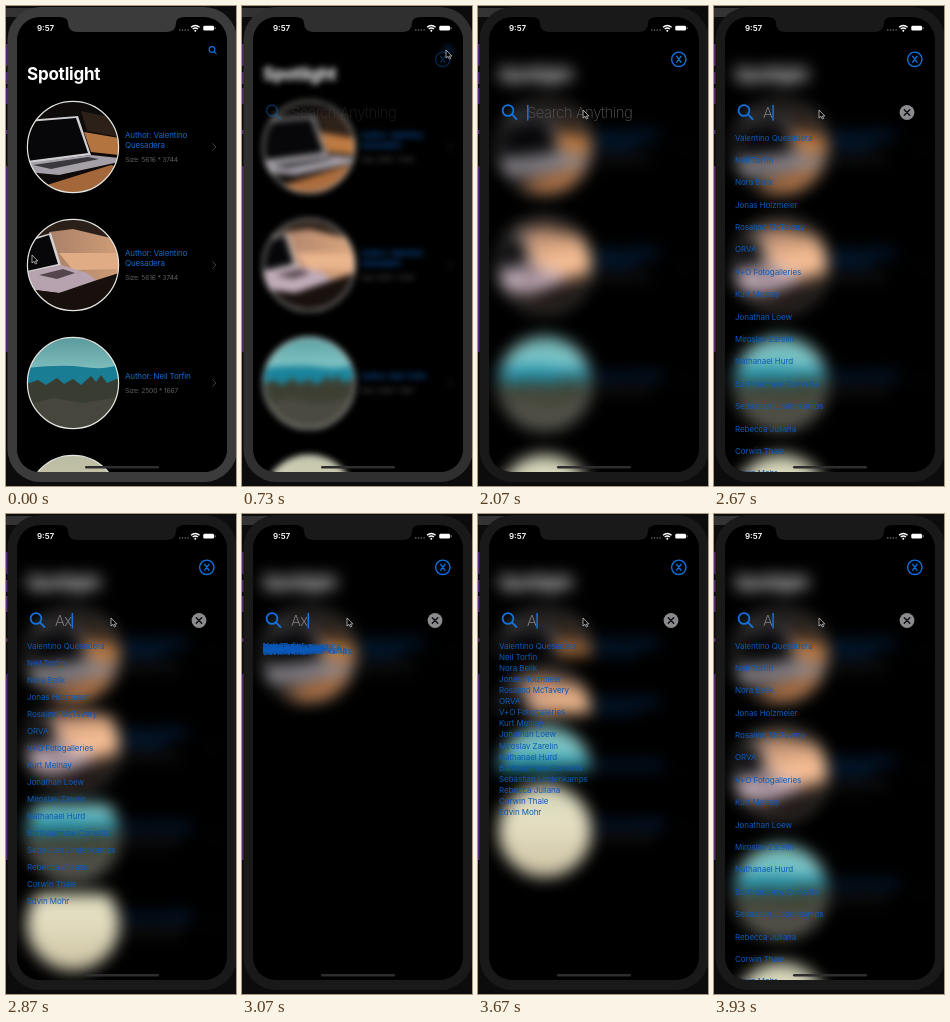
Write an HTML page that moves like this. It is 230 by 480 pixels and loops after 3.99 s.

```html
<!DOCTYPE html>
<html lang="en">
<head>
<meta charset="utf-8">
<title>Search overlay</title>
<style>
  html, body { margin: 0; width: 100%; height: 100%; overflow: hidden; background: #000; }
  svg { display: block; width: 230px; height: 480px; font-family: Inter, "Liberation Sans", sans-serif; }
  .title { font-size: 17px; font-weight: 700; letter-spacing: -.22px; fill: #fff; }
  .author { font-size: 8px; letter-spacing: -.17px; fill: #1269cf; }
  .size { font-size: 6.8px; letter-spacing: -.2px; fill: #5c5c60; }
  .name { font-size: 8px; letter-spacing: -.06px; fill: #0b5abb; }
  .field { font-size: 15px; font-weight: 200; letter-spacing: -.5px; }
  .clock { font-size: 8px; font-weight: 600; fill: #fff; }
  .line { fill: none; stroke: #1272e0; stroke-linecap: round; }
</style>
</head>
<body>
<svg viewBox="0 0 230 480">
  <defs>
    <clipPath id="screen"><rect x="11" y="11" width="210" height="455" rx="23"/></clipPath>
    <clipPath id="disc"><circle r="45.5"/></clipPath>
    <linearGradient id="sky" x2="0" y2=".4"><stop stop-color="#5a9a9c"/><stop offset="1" stop-color="#82c2c2"/></linearGradient>
    <linearGradient id="wood" x2="1" y2="0"><stop stop-color="#a98069"/><stop offset="1" stop-color="#cf9d76"/></linearGradient>
    <linearGradient id="haze" x2="0" y2="1"><stop stop-color="#b9bba2"/><stop offset=".4" stop-color="#cdc8ae"/><stop offset="1" stop-color="#b5ac90"/></linearGradient>

    <g id="photo0">
      <rect x="-46" y="-46" width="92" height="92" fill="#0d0a09"/>
      <path d="M8-36L46-28V-10L14-16Z" fill="#2c2019"/>
      <path d="M11-15L46-9V8L18 5Z" fill="#b4743f"/>
      <path d="M-46-27L5-31L18 8L-46 17Z" fill="#cfcdcf"/>
      <path d="M-46-25L3-29L15 6L-46 14Z" fill="#070709"/>
      <path d="M-46 16L18 8L46 11V15L-14 28L-46 25Z" fill="#a5a0a8"/>
      <path d="M-40 18L15 10L26 12L-22 22Z" fill="#3b383e"/>
      <path d="M-26 38L38 18L46 20L26 46H-18Z" fill="#a4673a"/>
    </g>
    <g id="photo1">
      <rect x="-46" y="-46" width="92" height="92" fill="#2a1f19"/>
      <path d="M-24-33L0-36L46-25V8L20 18L-20 8Z" fill="url(#wood)"/>
      <path d="M-14-12L46-12V4L0 5Z" fill="#dfac86"/>
      <path d="M-46-25L-22-32L-12 0L-46 9Z" fill="#d5d2d3"/>
      <path d="M-46-23L-24-30L-15-1L-46 6Z" fill="#070709"/>
      <path d="M-46 7L-12 0L14 8L24 16L0 25L-14 28L-46 24Z" fill="#b7a3af"/>
      <path d="M-34 10L-10 4L2 8L-16 14Z" fill="#55464d"/>
      <path d="M-46 24L-14 28L24 15L46 8V46H-46Z" fill="#17100d"/>
    </g>
    <g id="photo2">
      <rect x="-46" y="-46" width="92" height="92" fill="url(#sky)"/>
      <path d="M-46-15Q-10-19 10-16T46-18V6H-46Z" fill="#197d94"/>
      <path d="M-46 1L-35-3L-27 2L-16-5L-9 1L0-4L8 2L18-7L23-1L28-8L34 0L46-5V46H-46Z" fill="#393c30"/>
      <path d="M-46 22L-20 15L10 20L46 14V46H-46Z" fill="#46463d"/>
    </g>
    <rect id="photo3" x="-46" y="-46" width="92" height="92" fill="url(#haze)"/>
  </defs>

  <rect width="230" height="480" fill="#0c0c0c"/>
  <rect y="2" width="26" height="9" fill="#333"/>
  <path d="M0 38h2v22h-2zM0 66h2v12h-2zM0 82h2v16h-2zM0 124h2v4h-2zM0 160h2v186h-2z" fill="#582870"/>
  <rect id="shell" x="1.5" y="1" width="229.5" height="475" rx="33" fill="#3b3b3b"/>
  <g clip-path="url(#screen)">
    <rect width="230" height="480"/>
    <g id="list">
      <g id="rows"></g>
      <text class="title" x="21" y="74">Spotlight</text>
      <g id="glass" class="line" stroke-width="1.1"><circle cx="206" cy="43.5" r="2.9"/><path d="M208.2 45.7L210.3 48"/></g>
    </g>
    <g id="search">
      <g class="line" stroke-width="1.8">
        <circle cx="30" cy="104.5" r="5.4"/><path d="M34.2 108.7L38.5 113"/>
        <circle cx="200.8" cy="53.3" r="7.2" stroke-width="1.4"/>
        <path d="M198.7 50.4L202.9 56.2M202.9 50.4L198.7 56.2" stroke-width="1.4"/>
      </g>
      <text id="hint" class="field" x="49" y="112" fill="#58585a">Search Anything</text>
      <text id="typed" class="field" x="49" y="112" fill="#98989c"></text>
      <rect id="caret" y="99" width="1.5" height="15.5" fill="#1272e0"/>
      <g id="clear"><circle cx="193" cy="106.5" r="7.4" fill="#8b8b8e"/>
        <path d="M190.3 103.8l5.4 5.4m0-5.4l-5.4 5.4" stroke="#111" stroke-width="1.5" stroke-linecap="round"/></g>
      <g id="names"></g>
    </g>
    <rect x="79" y="460" width="74" height="2.4" rx="1.2" fill="#2e2e2e"/>
  </g>
  <path id="notch" d="M53 10H179V11Q170 11 170 17Q170 26 160 26H72Q62 26 62 17Q62 11 53 11Z" fill="#3b3b3b"/>
  <text class="clock" x="31" y="25">9:57</text>
  <path d="M173 24h10" stroke="#5c5c5c" stroke-width="1.4" stroke-dasharray="1.4 1.4"/>
  <g fill="none" stroke="#fff" stroke-width="1.3"><path d="M185 21.3Q189.3 17.6 193.6 21.3M186.7 23.1Q189.3 20.9 191.9 23.1"/></g>
  <circle cx="189.3" cy="24.7" r="1" fill="#fff"/>
  <rect x="197.3" y="19.8" width="10.7" height="4.8" rx="1.4" fill="#fff"/>
  <rect x="208.6" y="21.2" width="1" height="2" fill="#999"/>
  <path id="pointer" d="M0 0V8L2 6.3L3.4 9L4.7 8.4L3.4 6H5.8Z" fill="#000" stroke="#c4c4c4" stroke-width=".8"/>
</svg>
<script>
  const $ = id => document.getElementById(id);
  const LOOP = 3990, TICK = 1000 / 15;
  const ROW_TOP = 141, ROW_GAP = 118, NAME_TOP = 134.5, NAME_GAP = 22.39;

  const people = ["Valentino Quesadera", "Neil Torfin", "Nora Belik", "Jonas Holzmeier",
    "Rosalind McTavery", "ORVA", "V+O Fotogalleries", "Kurt Melnay", "Jonathan Loew",
    "Miroslav Zarelin", "Nathanael Hurd", "Bartholomew Corvetta", "Sebastian Lindenkamps",
    "Rebecca Juliana", "Corwin Thale", "Edvin Mohr"];
  const cards = [
    { by: ["Author: Valentino", "Quesadera"], size: "5616 * 3744" },
    { by: ["Author: Valentino", "Quesadera"], size: "5616 * 3744" },
    { by: ["Author: Neil Torfin"], size: "2500 * 1667" },
    { by: ["Author: Nora Belik"], size: "4288 * 2848" }
  ];
  // time, x, y
  const pointerPath = [[0, 26, 249], [130, 48, 225], [330, 128, 118], [530, 195, 47], [600, 204, 44],
    [1070, 204, 44], [1133, 192, 52], [1200, 171, 64], [1330, 145, 84], [1530, 122, 100],
    [1600, 122, 100], [1870, 110, 104], [2070, 105, 104]];

  // Each row is opaque, so overlapping rows hide one another.
  function card({ by, size }, i) {
    const start = by.length > 1 ? -9 : -4;
    const lines = by.map((s, n) => `<text class="author" x="119" y="${start + n * 10}">${s}</text>`).join("");
    return `<g><rect x="11" y="${-ROW_GAP / 2}" width="210" height="${ROW_GAP}"/>
      <g transform="translate(67)"><use href="#photo${i}" clip-path="url(#disc)"/>
      <circle r="45.6" fill="none" stroke="#e4e4e0" stroke-width="1.2"/></g>${lines}
      <text class="size" x="119" y="${start + by.length * 10 + 3.5}">Size: ${size}</text>
      <path d="M206.3-3.8L210 0L206.3 3.8" fill="none" stroke="#3e3e41"/></g>`;
  }

  $("rows").innerHTML = cards.map(card).join("");
  $("names").innerHTML = people.map(p => `<text class="name" x="21">${p}</text>`).join("");
  const rows = [...$("rows").children], names = [...$("names").children];

  const ramp = (t, a, b) => Math.min(1, Math.max(0, (t - a) / (b - a)));
  const smooth = p => p * p * (3 - 2 * p);
  const easeOut = p => 1 - (1 - p) ** 2;

  function along(path, t) {
    const i = path.findIndex(p => p[0] > t);
    if (i < 0) return path[path.length - 1].slice(1);
    const [a, b] = [path[i - 1], path[i]], p = ramp(t, a[0], b[0]);
    return [1, 2].map(k => a[k] + (b[k] - a[k]) * p);
  }

  let topFirst = null;
  function stackRows(first) {
    if (first === topFirst) return;
    topFirst = first;
    $("rows").append(...(first ? [...rows].reverse() : rows));
  }

  function draw(t) {
    const open = easeOut(ramp(t, 560, 1270));
    const dim = smooth(ramp(t, 560, 1000));
    const spread = t < 3200 ? 1 - smooth(ramp(t, 2760, 3095)) : smooth(ramp(t, 3470, 3865));
    const shown = t < 3120 ? 1 : ramp(t, 3300, 3600);

    $("shell").style.filter = $("notch").style.filter = `brightness(${1 - .58 * dim})`;
    $("list").style.filter = open ? `blur(${8 * open}px) brightness(${1 + .12 * open})` : "none";
    $("glass").style.opacity = 1 - dim;
    $("search").style.opacity = dim;

    stackRows(t > 2700 && t < 3200);
    rows.forEach((row, i) => row.setAttribute("transform", `translate(0 ${ROW_TOP + i * ROW_GAP * spread})`));
    names.forEach((name, i) => name.setAttribute("y", NAME_TOP + i * NAME_GAP * spread));
    $("rows").style.opacity = shown;
    $("names").style.opacity = shown * ramp(t, 2200, 2600);

    const text = t < 2260 ? "" : t > 2790 && t < 3320 ? "Ax" : "A";
    $("typed").textContent = text;
    $("hint").style.opacity = text ? 0 : 1;
    $("clear").style.opacity = text ? 1 : 0;
    $("caret").style.opacity = t > 1920 ? 1 : 0;
    $("caret").setAttribute("x", 49 + (text ? $("typed").getComputedTextLength() : 0));

    $("pointer").setAttribute("transform", `translate(${along(pointerPath, t)})`);
  }

  const begin = performance.now();
  function frame() {
    const t = (performance.now() - begin) % LOOP;
    draw(Math.floor((t + 5) / TICK) * TICK);
    requestAnimationFrame(frame);
  }
  frame();
</script>
</body>
</html>
```
